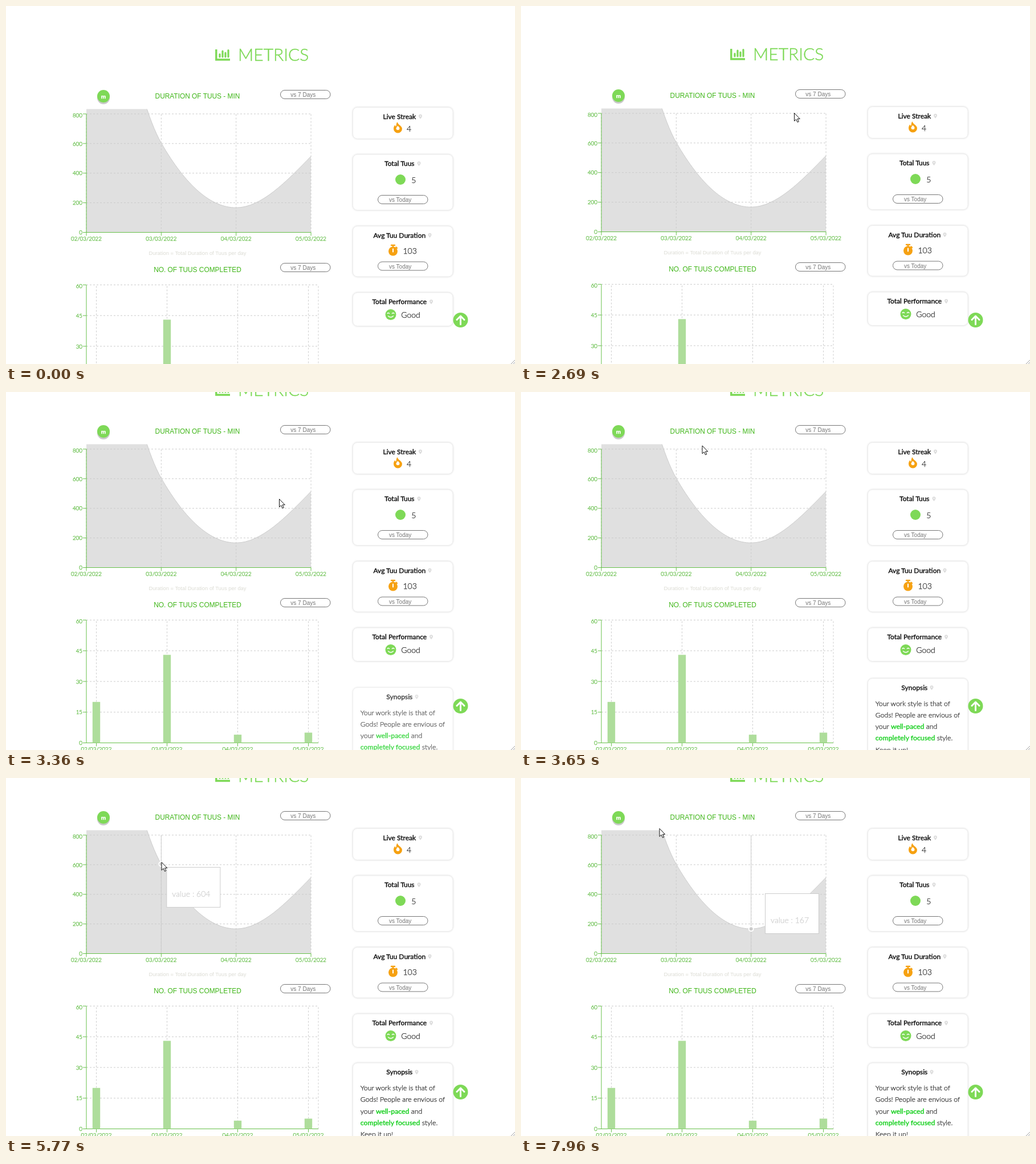
An HTML page that plays this animation: 893x627 px, repeating every 8000 ms.

```html
<!DOCTYPE html>
<html lang="en">
<head>
<meta charset="utf-8">
<title>Metrics</title>
<style>
  html, body { margin: 0; width: 100%; height: 100%; overflow: hidden; background: #fff; }
  svg { display: block; width: 100vw; height: 100vh; }
  text { font: 300 14px Lato, sans-serif; color: #222; fill: currentColor; stroke: currentColor; stroke-width: .25; }
  .arial { font-family: "Liberation Sans", Arial, sans-serif; font-weight: 400; stroke: none; }
  .head { font-size: 30px; color: #7ed957; stroke-width: .5; }
  .title { font-size: 11.9px; color: #3fb618; text-anchor: middle; }
  .note { font-size: 9.4px; color: #dcdcd4; text-anchor: middle; }
  .pill { font-size: 10px; color: #777; }
  .tick { font-size: 9.8px; color: #4bb32b; }
  .mid { text-anchor: middle; }
  .end { text-anchor: end; }
  .name { font-size: 12px; font-weight: 400; color: #111; stroke-width: .4; text-anchor: middle; }
  .body { font-size: 12.3px; }
  .body tspan { font-weight: 400; color: #14cf1c; fill: currentColor; stroke: currentColor; stroke-width: .4; }
  .badge { font-size: 10px; font-weight: 900; color: #fff; text-anchor: middle; }
  .value { color: #ccc; }
  .grid { stroke: #ccc; stroke-dasharray: 3 3; fill: none; }
  .axis { stroke: #67c14a; fill: none; }
  .card { fill: #fff; stroke: #ebebeb; filter: drop-shadow(0 0 1.5px #0002); }
  .white { stroke: #fff; fill: none; stroke-linecap: round; stroke-linejoin: round; }
</style>
</head>
<body>
<svg id="stage" viewBox="0 0 893 627" preserveAspectRatio="none"></svg>
<script>
const GREEN = '#7ed957', ORANGE = '#f6a111';
const SCROLLED = 89;
const LEFT = 141, BASE = 396.5, BAR_BASE = 703.5;
const MINUTES_PX = 0.2594, COUNT_PX = 3.585;
const VALUES = [2700, 604, 167, 514], COUNTS = [20, 43, 4, 5];
const TIP_W = 94, TIP_H = 70, TIP_GAP = 9;

const dayX = i => LEFT + i * 131.35;
const barX = i => 158.5 + i * 124;
const valueY = value => BASE - value * MINUTES_PX;
const range = (n, fn) => Array.from({ length: n }, (_, i) => fn(i));

const text = (x, y, cls, value) => `<text x="${x}" y="${y}" class="${cls}">${value}</text>`;
const path = (d, attrs) => `<path d="${d}" ${attrs}/>`;
const disc = (x, y, r, fill) => `<circle cx="${x}" cy="${y}" r="${r}" fill="${fill}"/>`;
const rect = (x, y, w, h, attrs) => `<rect x="${x}" y="${y}" width="${w}" height="${h}" ${attrs}/>`;

const pill = (x, y, label, indent) =>
  rect(x, y, 87.5, 15, 'rx="7.5" fill="#fff" stroke="#777"') + text(x + indent, y + 11.8, 'pill arial', label);

const pin = (x, y) =>
  path(`M${x} ${y + 4}q-3 -3.5 -3 -5a3 3 0 0 1 6 0q0 1.5 -3 5z`, 'fill="#ddd"') + disc(x, y - 1, 1, '#fff');

const card = (y, h, label, pinX) =>
  rect(608.5, y, 175.5, h, 'rx="8" class="card"') + text(690.3, y + 20.2, 'name', label) + pin(pinX, y + 16.3);

function grid(xs, ys, right) {
  return path(ys.map(y => `M${LEFT} ${y}H${right}`).join('') +
    xs.map(x => `M${x} ${ys[0]}V${ys[ys.length - 1]}`).join(''), 'class="grid"');
}

function axes(xs, ys, step, right) {
  const bottom = ys[0], last = ys.length - 1;
  const d = `M${LEFT} ${ys[last]}V${bottom}H${right}` + ys.map(y => `M${LEFT} ${y}h-6`).join('') +
    xs.map(x => `M${x} ${bottom}v6`).join('');
  return path(d, 'class="axis"') +
    ys.map((y, i) => text(134, y + (i === last ? 6 : 3.7), 'tick end', i * step)).join('') +
    xs.map((x, i) => text(x, bottom + 14, 'tick mid', `0${i + 2}/03/2022`)).join('');
}

// Monotone cubic through the daily values, with the slopes worked out per day.
function curve() {
  const dx = dayX(1) - dayX(0), ys = VALUES.map(valueY);
  const s = range(3, i => (ys[i + 1] - ys[i]) / dx);
  const slopes = [(3 * s[0] - 2 * s[1]) / 2, 2 * s[1], 0, 1.5 * s[2]];
  return `M${LEFT} ${ys[0]}` + range(3, i =>
    `C${dayX(i) + dx / 3} ${ys[i] + slopes[i] * dx / 3} ${dayX(i + 1) - dx / 3} ` +
    `${ys[i + 1] - slopes[i + 1] * dx / 3} ${dayX(i + 1)} ${ys[i + 1]}`).join('');
}

function areaChart() {
  const xs = range(4, dayX), ys = range(5, i => valueY(200 * i)), line = curve();
  return grid(xs, ys, dayX(3)) +
    `<clipPath id="plot">${rect(LEFT, 180.5, dayX(3) - LEFT, 216, '')}</clipPath><g clip-path="url(#plot)">` +
    path(`${line}V${BASE}H${LEFT}Z`, 'fill="#ccc" fill-opacity=".6"') +
    path(line, 'fill="none" stroke="#ccc"') + '</g>' + axes(xs, ys, 200, dayX(3));
}

function barChart() {
  const xs = range(4, barX), ys = range(5, i => BAR_BASE - 15 * i * COUNT_PX);
  const bars = COUNTS.map((n, i) =>
    rect(barX(i) - 6.7, BAR_BASE - n * COUNT_PX, 13.4, n * COUNT_PX, 'fill="#aedd9b"')).join('');
  return grid([...xs, 548], ys, 548) + axes(xs, ys, 15, 548) + bars;
}

const headIcon = path('M368.8 76V94H393', `fill="none" stroke="${GREEN}" stroke-width="3.4"`) +
  path('M375 84.5V89M380 79V89M385 82V89M390 77.5V89', `stroke="${GREEN}" stroke-width="3.2" stroke-linecap="round"`);

const flame = path('M686.5 203c1 5 8.500 7 8.500 12a7.500 7.500 0 0 1 -15 0c0 -3 1 -5 2.500 -6.500c.5 1.500 1 2 2 2.500c0 -3.500 .5 -5.500 2 -8z', `fill="${ORANGE}"`) +
  path('M687.5 209.500c.5 2 3 2.500 3 4.800a3 3 0 0 1 -6 0c0 -2 2 -2.800 3 -4.800z', 'fill="#fff"');

const timer = disc(679, 429.5, 8, ORANGE) +
  path('M676 419h6M679 419v4M684.5 422.5l1.5 1.5', `stroke="${ORANGE}" stroke-width="2.4" stroke-linecap="round"`) +
  path('M679 425.5v5', 'class="white" stroke-width="2"');

const smile = disc(675, 540.5, 9.5, GREEN) +
  path('M669 538.5q1.8 -2 3.6 0M677.4 538.5q1.8 -2 3.6 0M670.5 543q4.5 4 9 0', 'class="white" stroke-width="1.3"');

const synopsis = [
  'Your work style is that of',
  'Gods! People are envious of',
  'your <tspan>well-paced</tspan> and',
  '<tspan>completely focused</tspan> style.',
  'Keep it up!'
].map((line, i) => text(621.8, 636.2 + i * 20.2, 'body', line)).join('');

document.getElementById('stage').innerHTML = `
  <g id="page">
    ${headIcon}${text(407, 95.5, 'head', 'METRICS')}
    ${disc(171, 161, 11, '#c9c9c9')}${disc(171, 158, 11, GREEN)}${text(171, 162, 'badge', 'm')}
    ${text(336, 162, 'title arial', 'DURATION OF TUUS - MIN')}${pill(481.5, 147.5, 'vs 7 Days', 17.8)}
    ${areaChart()}
    ${text(336, 435.5, 'note arial', 'Duration = Total Duration of Tuus per day')}
    ${text(336, 466, 'title arial', 'NO. OF TUUS COMPLETED')}${pill(481.5, 450.5, 'vs 7 Days', 17.8)}
    ${barChart()}
    ${card(177.5, 55, 'Live Streak', 727)}${flame}${text(703, 219.7, '', '4')}
    ${card(260, 97.5, 'Total Tuus', 724.5)}${disc(692, 304, 9, GREEN)}${text(711.3, 309.7, '', '5')}
    ${pill(652.5, 331.5, 'vs Today', 19.5)}
    ${card(385.5, 88.5, 'Avg Tuu Duration', 743.5)}${timer}${text(696.5, 434.3, '', '103')}
    ${pill(652.5, 448, 'vs Today', 19.5)}
    ${card(502, 58.5, 'Total Performance', 746)}${smile}${text(693.3, 545.7, '', 'Good')}
    <g id="synopsis">${card(588, 160, 'Synopsis', 720.5)}${synopsis}</g>
  </g>
  <g id="hover">
    <path id="rule" d="M0 100V307" stroke="#ccc"/>
    <circle id="dot" r="4" fill="#ccc" stroke="#fff" stroke-width="2"/>
    <g id="tip">${rect(0.5, 0.5, TIP_W, TIP_H, 'fill="#fff" stroke="#ccc"')}
      <text id="value" class="value" x="10" y="52"></text></g>
  </g>
  ${disc(797.5, 550, 13, GREEN)}
  ${path('M797.5 557.5V543M791 549.5l6.5 -6.5l6.5 6.5', 'class="white" stroke-width="3"')}
  ${path('M886 627l7 -7M890 627l3 -3', 'stroke="#888" stroke-width=".8"')}
  <path id="mouse" d="M.5 .5V14.5L3.7 11.5L6 16.5L8.3 15.5L6 10.7H10.3Z" fill="#fff" stroke="#111"/>`;

// Pointer strokes: from, to (ms), then where the stroke ends.
const STROKES = [
  [530, 1000, 570, 45], [1000, 1310, 498, 83], [1340, 1600, 452, 84], [1600, 1870, 497, 83],
  [2120, 2440, 479, 187], [3500, 3650, 317.5, 93.5], [3700, 4290, 237.5, 97], [4350, 4510, 231, 89],
  [4670, 4830, 249, 93], [5180, 5500, 272.5, 147], [6180, 7800, 530, 287], [7800, 7960, 242.5, 88]
];
const HOVER_FROM = 5200, HOVER_LAG = 70, GLIDE = 240;

const progress = (t, from, to) => Math.min(1, Math.max(0, (t - from) / (to - from)));
const smooth = p => p * p * (3 - 2 * p);

function pointer(t) {
  let x = 886, y = 612;
  for (const [from, to, toX, toY] of STROKES) {
    const k = smooth(progress(t, from, to));
    x += (toX - x) * k;
    y += (toY - y) * k;
  }
  return [x, y];
}

const nearestDay = x => Math.min(3, Math.max(0, Math.round((x - LEFT) / 131.35)));

// The tip sits below right of the hovered day and flips at the plot's edges.
function tipTarget(t) {
  const [x, y] = pointer(t), day = dayX(nearestDay(x));
  return [
    day + TIP_GAP + TIP_W > dayX(3) ? day - TIP_GAP - TIP_W : day + TIP_GAP,
    y + TIP_GAP + TIP_H > BASE - SCROLLED ? y - TIP_GAP - TIP_H : y + TIP_GAP
  ];
}

// Gliding: the mean of the recent targets.
function tipPosition(t) {
  const n = 24, recent = range(n, i => tipTarget(t - i * GLIDE / n));
  return [0, 1].map(axis => recent.reduce((sum, p) => sum + p[axis], 0) / n);
}

const el = id => document.getElementById(id);
const move = (id, x, y) => el(id).setAttribute('transform', `translate(${x} ${y})`);
const show = (id, on) => { el(id).style.display = on ? '' : 'none'; };

function draw(t) {
  move('page', 0, t < 2690 ? 0 : -1 - (SCROLLED - 1) * smooth(progress(t, 2700, 2900)));

  const left = (1 - progress(t, 2880, 3880)) ** 2.4;
  el('synopsis').style.opacity = 1 - left;
  move('synopsis', 0, 90 * left);

  show('mouse', t >= STROKES[0][0]);
  move('mouse', ...pointer(t));

  show('hover', t >= HOVER_FROM);
  const seen = t - HOVER_LAG, day = nearestDay(pointer(seen)[0]);
  move('rule', dayX(day), 0);
  move('dot', dayX(day), valueY(VALUES[day]) - SCROLLED);
  move('tip', ...tipPosition(seen));
  el('value').textContent = 'value : ' + VALUES[day];
}

const start = performance.now();
function tick() {
  draw((performance.now() - start) % 8000);
  requestAnimationFrame(tick);
}
tick();
</script>
</body>
</html>
```
